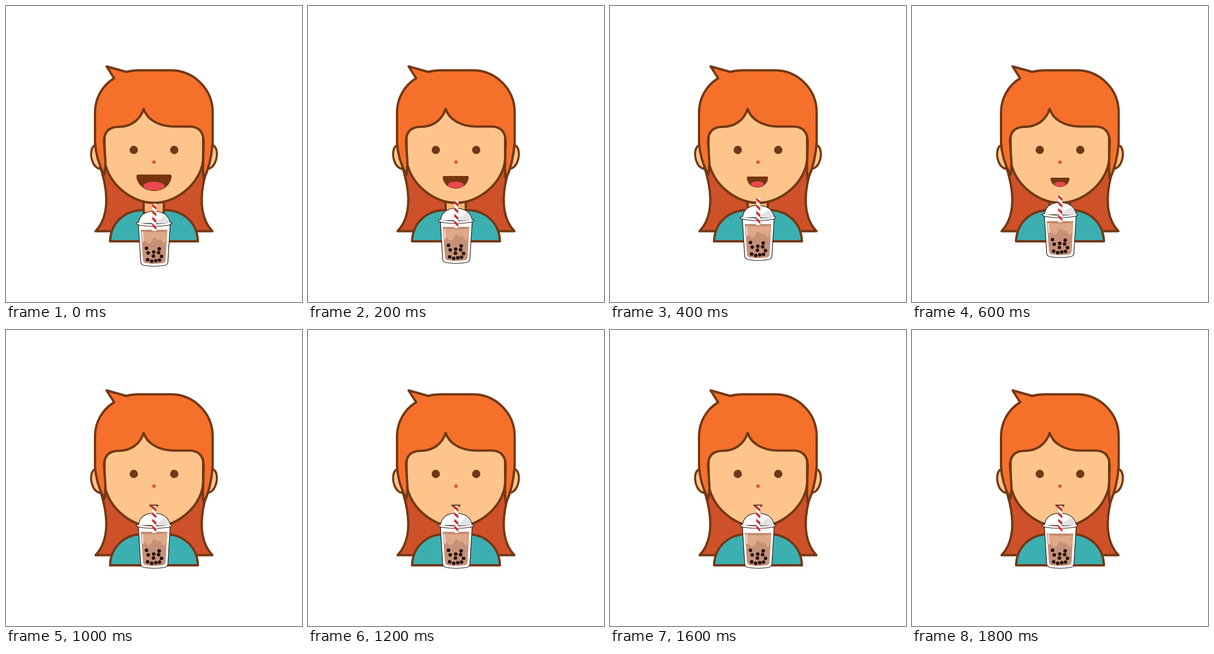
These frames come from a looping animation (512x512 px, 2000 ms). An HTML page with a canvas:

```html
<!DOCTYPE html>
<html lang="en">
<head>
<meta charset="utf-8">
<title>Bubble tea</title>
<style>
html, body { margin: 0; width: 100%; height: 100%; overflow: hidden; background: #fff; }
canvas { display: block; width: 512px; height: 512px; }
</style>
</head>
<body>
<canvas id="stage" width="512" height="512"></canvas>
<script>
const ctx = document.getElementById('stage').getContext('2d');
const BROWN = '#733814', INK = '#2a1a14', SKIN = '#fdc58b';
const STEP = 200, STEPS = 10;

function shape(d, fill, line, width = 4) {
  const path = new Path2D(d);
  if (fill) { ctx.fillStyle = fill; ctx.fill(path); }
  if (line) { ctx.strokeStyle = line; ctx.lineWidth = width; ctx.stroke(path); }
}

function dot(x, y, r, color) {
  ctx.fillStyle = color;
  ctx.beginPath();
  ctx.arc(x, y, r, 0, Math.PI * 2);
  ctx.fill();
}

function drawGirl() {
  // long hair behind the shoulders
  shape('M158 262C169 294 177 325 172 354Q168 376 155 389.500H357Q344 376 340 354C335 325 343 294 354 262Z', '#cf5129', BROWN);
  shape('M180 407C181 376 204 353 238 353H274C308 353 331 376 332 407Z', '#3cafb1', BROWN);
  shape('M238 330V357Q256 374 273 357V330Z', '#fbb676', BROWN);
  // ears
  shape('M156 240C145 243 146 260 150 270Q154 280 163 282V240Z', SKIN, BROWN, 3.6);
  shape('M356 240C367 243 366 260 362 270Q358 280 349 282V240Z', SKIN, BROWN, 3.6);
  // face
  shape('M170.500 172V262C171 300 212 340.500 256 340.500C300 340.500 341 300 341 262V172Z', SKIN, BROWN);
  // hair in front
  shape('M174 104.500L208 114Q218 111.300 230 111.300H285C325 111.300 357.500 144 357.500 184V236C356 257 352 279 342 300Q340 285 341 270L342 234Q341 208.500 317 208.500H288C263 207.500 244 196 238 178C232 198 215 209 195 209Q170 209 169.500 234L172 270Q172 283 170 292C162 277 155 257 154 236V184C154 160 166 138 187 125Z', '#f5702a', BROWN);
  dot(221, 249, 7.2, '#74361a');
  dot(291, 249, 7.2, '#74361a');
  dot(256, 270, 3.1, '#df5647');
}

// Half-round smile, hanging from a flat top edge
function drawMouth([x, top, half, depth]) {
  ctx.save();
  ctx.translate(x, top);
  ctx.scale(half, depth);
  const smile = new Path2D('M-.9 0H.9Q1 0 1 .14C.93 .68 .5 1 0 1S-.93 .68 -1 .14Q-1 0 -.9 0Z');
  ctx.fillStyle = '#76350f';
  ctx.fill(smile);
  ctx.clip(smile);
  ctx.fillStyle = '#e9484f';
  ctx.beginPath();
  ctx.ellipse(0, .7, .6, .26, 0, 0, Math.PI * 2);
  ctx.fill();
  ctx.restore();
}

function drawSip() {
  shape('M248.500 303H263L259 307H253Z', '#d98b55', BROWN, 1.8);
}

const PEARLS = [[243, 419], [265, 420], [246, 427], [255.500, 425.500], [264, 426.500],
  [255, 432.500], [269, 433], [245, 439], [252, 441.500], [259, 440.500], [265.500, 439.500]];

function drawStraw() {
  ctx.save();
  ctx.beginPath();
  ctx.rect(253, 342, 7, 47);
  ctx.fillStyle = '#fff';
  ctx.fill();
  ctx.clip();
  for (let y = 341.5; y < 380; y += 11.5) {
    shape(`M253 ${y}L260 ${y + 6}V${y + 11}L253 ${y + 5}Z`, '#d9252b');
  }
  ctx.restore();
}

function drawCup(lift, drunk) {
  ctx.save();
  ctx.translate(0, -lift);

  shape('M229 378L233 443Q233.500 447 238 448.500Q256 452 275 448.500Q279.500 447 280 443L284 378Z', '#fff', INK, 1.2);

  ctx.save();
  ctx.clip(new Path2D('M233 387H279L276 440Q275 445 269 445Q256 447 244 445Q238 445 237 440Z'));
  ctx.translate(0, drunk);
  shape('M230 388H282V450H230Z', '#c69078');
  shape('M230 388H282V402Q276 407 273 411Q270 409 268 404Q264 402 262 405Q258 398 254 402Q250 412 245 410Q240 405 237 406L230 403Z', '#dfa888');
  shape('M230 387H282V389.500Q256 393 230 389.500Z', '#c28d70');
  ctx.restore();
  shape('M236 391L237 408', null, '#f6e6dc', 1.8);
  for (const [x, y] of PEARLS) dot(x, y, 3.1, '#26120f');

  // domed lid and rim
  shape('M229 376C231 361 242 355 256 355S282 361 284 376Z', '#fff', INK, 1.2);
  shape('M262 371L276 362Q281 367 282 374Q272 377 262 376Z', '#e3e3e3');
  shape('M228 374.500Q256 381 285 374.500L287 376Q284 379 279 379.500Q256 383 233 379.500Q227 379 225 376Z', '#fff');
  shape('M229 374L225 375.500Q227 379 233 379.500Q256 383 279 379.500Q285 379 287 375.500L284 374', null, INK, 1.2);
  drawStraw();
  ctx.restore();
}

// x, top, half width and depth while the smile closes
const MOUTHS = [[256, 291.500, 30.500, 28.500], [255.500, 294, 22.500, 22], [255, 295, 18.500, 19],
  [256, 297, 16.500, 16], [256, 299, 12.500, 12]];

function render(step) {
  const sipping = step >= MOUTHS.length;
  ctx.fillStyle = '#fff';
  ctx.fillRect(0, 0, 512, 512);
  drawGirl();
  if (sipping) drawSip();
  else drawMouth(MOUTHS[step]);
  drawCup(sipping ? 38 : step * 5, Math.max(0, step - 6));
}

const start = performance.now();
function tick() {
  render(Math.floor((performance.now() - start) / STEP) % STEPS);
  requestAnimationFrame(tick);
}

ctx.lineJoin = 'round';
tick();
</script>
</body>
</html>
```
